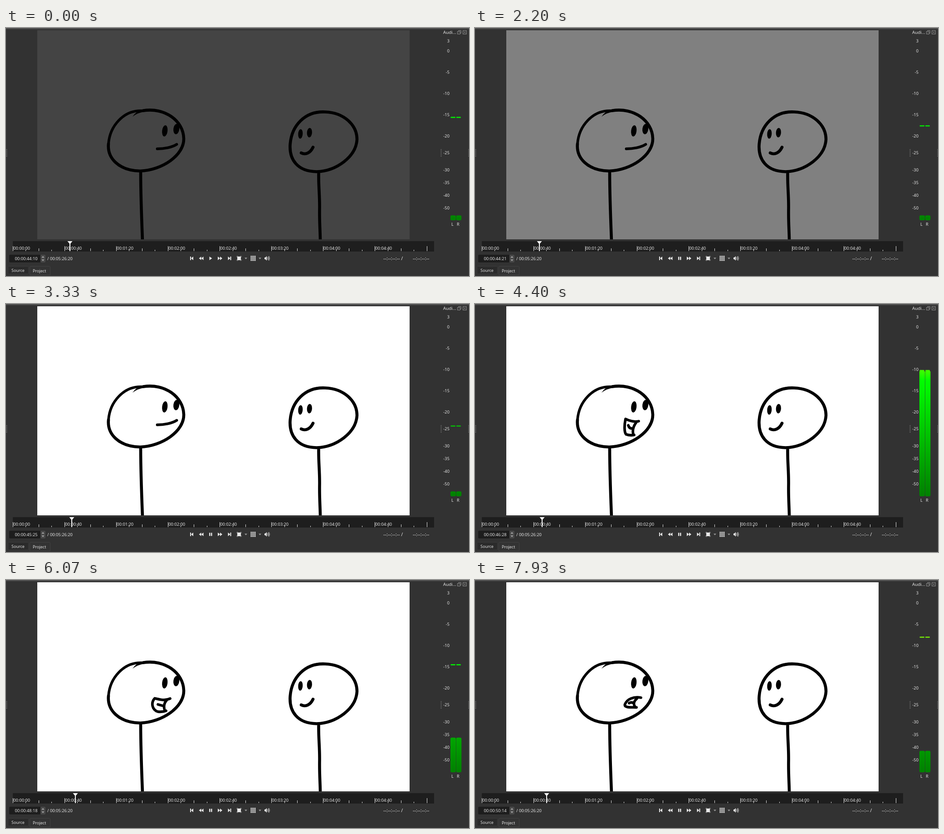
An HTML page for the animation above (8000 ms loop, 1021 by 548 pixels).

```html
<!DOCTYPE html>
<html lang="en">
<head>
<meta charset="utf-8">
<title>Editor preview</title>
<style>
  html, body { margin: 0; width: 100%; height: 100%; overflow: hidden; background: #323232; }
  svg { display: block; width: 1021px; height: 548px; }
  text { font: 9.3px "Noto Sans", "Open Sans", sans-serif; fill: #e4e4e4; }
  .tab { font-size: 9px; }
  .dashes { font-size: 10.8px; }
  .ink { fill: none; stroke: #000; stroke-width: 6.6; stroke-linecap: round; stroke-linejoin: round; }
  .mouth { stroke-width: 5.8; }
  .lid { stroke-width: 4; }
  .icon { fill: #e8e8e8; }
  .line { fill: none; stroke: #8c8c8c; }
</style>
</head>
<body>
<svg viewBox="0 0 1021 548">
  <defs>
    <linearGradient id="level" gradientUnits="userSpaceOnUse" x1="0" y1="425" x2="0" y2="80">
      <stop offset="0" stop-color="#008000"/>
      <stop offset=".74" stop-color="#0f0"/>
      <stop offset="1" stop-color="#ff0"/>
    </linearGradient>
    <clipPath id="screen"><rect x="69" y="5" width="821" height="462"/></clipPath>
  </defs>

  <rect width="1021" height="548" fill="#323232"/>
  <path d="M0 1.5H1021" stroke="#747474"/>

  <rect id="backdrop" x="69" y="5" width="821" height="462"/>
  <g clip-path="url(#screen)">
    <path class="ink" d="M303 182.5C350 175 391 205 392 244C393 281 345 314 296 316C248 315 223 287 226 256"/>
    <path class="ink mouth" d="M226 256C229 216 260 181 300 183"/>
    <path d="M279 196Q287 183 305 180L306 185Q290 187 279 196Z"/>
    <path class="ink" d="M297 320C297 360 299 420 301 470"/>
    <ellipse cx="350.3" cy="227.3" rx="6" ry="12.4" transform="rotate(7 350 227)"/>
    <ellipse cx="375.7" cy="223.3" rx="6.5" ry="11.6" transform="rotate(7 376 223)"/>
    <path id="mouth" class="ink mouth"/>

    <path class="ink" d="M704 185.5C745 187 774 214 774 246C772 285 728 316 685 317.5C642 317 625 290 626.5 259C629 215 660 183 704 185.5Z"/>
    <path class="ink" d="M689.5 322C689 350 692 370 691.5 400C691 430 693 450 693 470"/>
    <g id="eyesOpen">
      <ellipse cx="649.3" cy="234" rx="5" ry="10.5" transform="rotate(4 649 234)"/>
      <ellipse cx="669.3" cy="231.2" rx="5.6" ry="10.5" transform="rotate(4 669 231)"/>
    </g>
    <path id="eyesShut" class="ink lid" d="M646 236.3L652 235M666 233.5L673 232.6"/>
    <path class="ink" d="M651 276C661 281 671 276 677 263.5"/>
  </g>

  <g id="ruler"><rect x="15" y="471" width="929" height="23" fill="#1e1e1e"/></g>
  <path id="head" d="M-5.5 471H5.5L1 476.5V493H-1V476.5Z" fill="#fff"/>

  <rect x="7" y="501" width="69" height="17" rx="2" fill="#1d1d1d"/>
  <rect x="76" y="501" width="11" height="17" rx="2" fill="#484848"/>
  <path d="M78.5 507.5L81.5 504L84.5 507.5ZM78.5 511.5L81.5 515L84.5 511.5Z" fill="#aaa"/>
  <text id="clock" x="19.5" y="513"></text>
  <text x="91" y="513">/ 00:05:26:20</text>
  <text class="dashes" x="832" y="513">--:--:--:-- /</text>
  <text class="dashes" x="897" y="513">--:--:--:--</text>

  <path d="M4.5 543.5V528.5Q4.5 526.5 6.5 526.5H47.5Q49.5 526.5 49.5 528.5V543.5Z" fill="#2b2b2b" stroke="#3c3c3c"/>
  <path d="M52.5 545.5V528.5Q52.5 526.5 54.5 526.5H95.5Q97.5 526.5 97.5 528.5V545.5Z" fill="#333" stroke="#424242"/>
  <text class="tab" x="12" y="539">Source</text>
  <text class="tab" x="59" y="540">Project</text>

  <rect id="hover" x="441.5" y="501.5" width="18" height="16" rx="2" fill="#3d3d3d" stroke="#4c4c4c"/>
  <g class="icon">
    <path d="M406 505H408V513H406ZM413 505V513L408 509Z"/>
    <path d="M430.5 505V513L425.5 509ZM435.5 505V513L430.5 509Z"/>
    <path id="play" d="M448.5 505V513L454.5 509Z"/>
    <path id="pause" d="M448 505.5H450.5V512.5H448ZM452 505.5H454.5V512.5H452Z"/>
    <path d="M467 505V513L472 509ZM472 505V513L477 509Z"/>
    <path d="M489.5 505V513L494.5 509ZM494.5 505H496.5V513H494.5Z"/>
    <path d="M510 505H518V513H510Z"/>
    <path d="M509 507V504H512M516 504H519V507M519 511V514H516M512 514H509V511" fill="none" stroke="#888"/>
    <path d="M526 507.5H532L529 511ZM557 507.5H563L560 511Z" fill="#999"/>
    <path d="M540.5 503V515M543.5 503V515M546.5 503V515M549.5 503V515M539 504.5H551M539 507.5H551M539 510.5H551M539 513.5H551" fill="none" stroke="#ddd"/>
    <path d="M570 507H572L575 504V514L572 511H570Z"/>
    <path d="M576.5 506.5Q578 509 576.5 511.5M578 505Q580.5 509 578 513M579.5 504Q583 509 579.5 514" fill="none" stroke="#ddd"/>
  </g>

  <text x="964" y="13" style="font-size:9.8px">Audi...</text>
  <path class="line" d="M995.5 7.5H1001.5V13.5H995.5ZM998 7V5.5H1003.5V11.5H1002M997.5 11.5L999.5 9.5"/>
  <path class="line" d="M1007.5 5.5H1015.5V13.5H1007.5ZM1009 7L1014 12M1014 7L1009 12"/>
  <g id="scale" text-anchor="end"></g>
  <text x="982" y="437">L</text>
  <text x="994" y="437">R</text>
  <g fill="url(#level)">
    <rect class="bar" x="980" width="12" rx="3"/>
    <rect class="bar" x="992.6" width="11.8" rx="3"/>
    <rect class="peak" x="980.5" width="10.5" height="2.4" rx="1"/>
    <rect class="peak" x="993" width="10" height="2.4" rx="1"/>
  </g>
  <path d="M1.5 268V284M959.5 268V284M1020.5 268V284" stroke="#8a8a8a" stroke-width="2" stroke-dasharray="1 2"/>

  <path id="cursor" d="M0 0V15L3.5 11.8L5.8 17L8 16L5.8 11H10.3Z" fill="#fff" stroke="#000" stroke-width=".8"/>
</svg>
<script>
const $ = id => document.getElementById(id);
const all = name => [...document.querySelectorAll(name)];
const pad = n => String(n).padStart(2, '0');

const LOOP = 8000, TICK = 1000 / 15, CLICK = 1730, START = 1800;
const FPS = 30, FIRST_FRAME = 44 * FPS + 10;
const FLOOR = 425, QUIET = 414, DECAY = 280, PEAK_FALL = .047;

const MOUTHS = {
  flat: 'M333.5 267C348 267 366 264 376.5 257',
  smile: 'M323 264C335 274 350 276 363.5 270',
  tall: 'M361 259C352 261 342 259 332 254C329 268 329 283 333 288Q341 291 351 289.5M356 261C349 270 347 280 349 288M338 268Q340 276 348 275',
  wide: 'M362 262C350 267 344 265 328 261.5C319 271 322 287 335 291Q346 292 353 289M354 266C347 274 348 282 350 288M335 275L346 278',
  teeth: 'M366 260C350 257 335 263 330.5 275C329 283 345 281 356 281.5M357 262C350 268 349 275 353 280M340 272Q345 269 349 272'
};
const TALK = ['wide', 'teeth', 'tall'];

// Loud syllables: time and the height the meter reaches.
const SYLLABLES = [[3600, 190], [4000, 181], [4400, 147], [4800, 137], [5200, 155], [5700, 170], [6230, 147], [7330, 98]];

function mouthAt(t) {
  if (t < 3470) return 'flat';
  if (t > 6700 && t < 7130) return 'smile';
  return TALK[Math.floor(t / 250) % TALK.length];
}

// The bar sinks back to quiet after each syllable; the peak marker falls steadily.
function meterAt(t) {
  let bar = QUIET, peak = 197.5 + PEAK_FALL * (t - START);
  for (const [at, top] of SYLLABLES) {
    if (at > t) break;
    bar = Math.min(bar, QUIET - (QUIET - top) * Math.exp((at - t) / DECAY));
    peak = Math.min(peak, top + PEAK_FALL * (t - at));
  }
  return { bar, peak: Math.min(bar, peak) };
}

// Playback lags a little in its first two seconds.
function frameAt(played) {
  const lag = 2 * Math.sin(Math.PI * Math.min(1, played / 2000));
  return FIRST_FRAME + Math.round(played * FPS / 1000 - lag);
}

// Meter scale, compressed in steps below -20 dB.
function dbToY(db) {
  const below = limit => Math.max(0, limit - db);
  return Math.max(28, 50 - 9.4 * db - 1.88 * (below(-20) + below(-30)) - 2.82 * below(-40));
}

function buildRuler() {
  let labels = '', ticks = '';
  for (let i = 0; i <= 32; i++) {
    const x = Math.floor(15 + i * 28.535) + .5;
    ticks += `M${x} ${i % 4 === 0 ? 482 : i % 2 === 0 ? 487 : 490}V493`;
    if (i % 4 === 0 && i < 32) {
      const s = i * 10;
      labels += `<text x="${x + .8}" y="490">00:${pad(Math.floor(s / 60))}:${pad(s % 60)}</text>`;
    }
  }
  $('ruler').innerHTML += labels + `<path d="${ticks}" stroke="#e0e0e0"/>`;
}

function buildScale() {
  const label = db => `<text x="978" y="${dbToY(db) + 3.5}">${db}</text>`;
  let html = label(3);
  for (let db = 0; db >= -40; db -= 5) html += label(db);
  $('scale').innerHTML = html + label(-50);
}

const show = (id, on) => $(id).setAttribute('visibility', on ? 'visible' : 'hidden');

function render(time) {
  const t = Math.floor((time + 5) / TICK) * TICK + .5;
  const played = Math.max(0, t - START);

  const frame = frameAt(played), seconds = frame / FPS;
  $('clock').textContent = `00:00:${pad(Math.floor(seconds))}:${pad(frame % FPS)}`;
  $('head').setAttribute('transform', `translate(${Math.floor(14.7 + seconds * 2.853)})`);

  const grey = Math.min(255, Math.round(68 + .1545 * played - 1.3e-5 * played ** 2));
  $('backdrop').setAttribute('fill', `rgb(${grey},${grey},${grey})`);

  const blink = t > 6860 && t < 7000;
  show('eyesOpen', !blink);
  show('eyesShut', blink);
  $('mouth').setAttribute('d', MOUTHS[mouthAt(t)]);

  const { bar, peak } = meterAt(START + played);
  for (const rect of all('.bar')) {
    rect.setAttribute('y', bar);
    rect.setAttribute('height', FLOOR - bar);
  }
  for (const rect of all('.peak')) rect.setAttribute('y', peak - 1.2);

  const cursorY = 511 + Math.max(0, 1330 - t, 2 * (t - START)) / 10;
  show('cursor', cursorY < 548);
  show('hover', cursorY < 518);
  $('cursor').setAttribute('transform', `translate(449 ${cursorY})`);
  show('play', t < CLICK);
  show('pause', t >= CLICK);
}

buildRuler();
buildScale();
render(0);
let start;
requestAnimationFrame(function tick(now) {
  start ??= now;
  render((now - start) % LOOP);
  requestAnimationFrame(tick);
});
</script>
</body>
</html>
```
